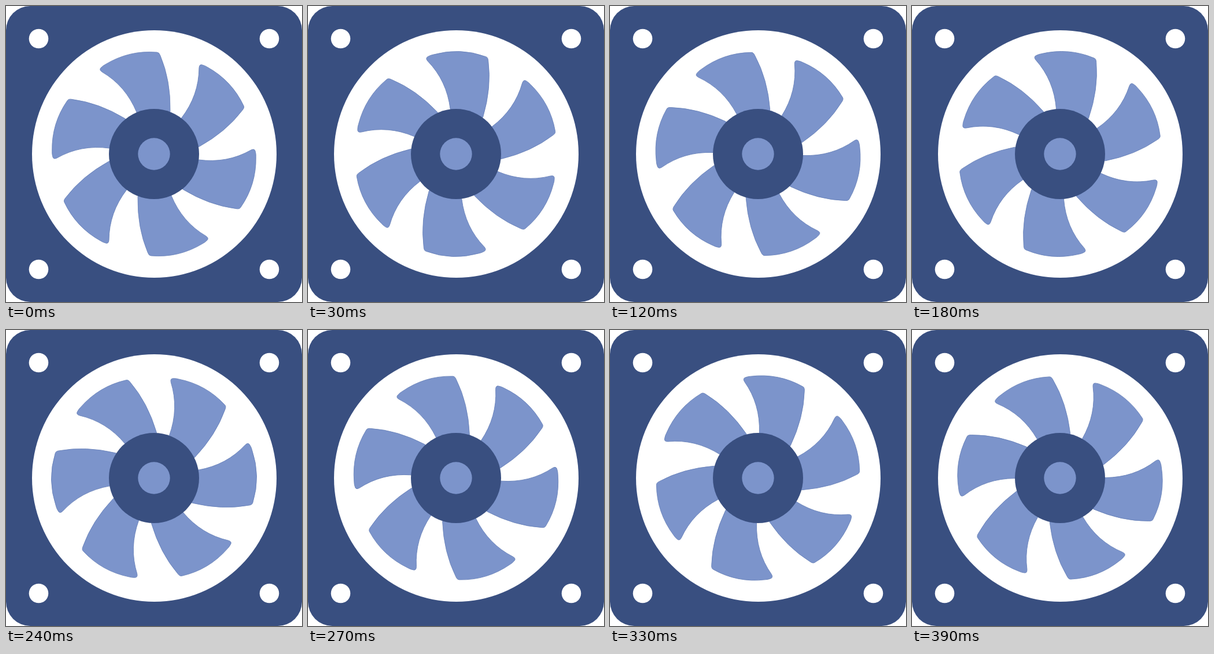
An HTML page with a canvas for the animation above (0.42 s loop, 512 by 512 pixels).

```html
<!DOCTYPE html>
<html lang="en">
<head>
<meta charset="utf-8">
<title>Fan</title>
<style>
html, body { margin: 0; width: 100%; height: 100%; overflow: hidden; background: #fff; }
canvas { display: block; width: 512px; height: 512px; }
</style>
</head>
<body>
<canvas id="stage" width="512" height="512"></canvas>
<script>
const ctx = document.getElementById('stage').getContext('2d');
const DARK = '#394f80', LIGHT = '#7c94cb', EDGE = '#6780b8', WHITE = '#fff';
const CENTER = 256, STEP = 30, STEPS = 14;

// [step, degrees]: the rotor speeds up and slows down over half a turn
const TURN = [[0, 0], [2, 30.8], [4, 54.5], [6, 77.9], [8, 102.4], [10, 130.5], [13, 172.2], [14, 180]];

const blade = new Path2D(`M226 184 Q207 138 166 114 Q160 110 165 106
  Q168 103 172 101 Q213.4 76 261 80 Q265 80 267 86 Q285 129 284 182 L256 256 Z`);

function disc(x, y, rx, color, ry = rx) {
  ctx.fillStyle = color;
  ctx.beginPath();
  ctx.ellipse(x, y, rx, ry, 0, 0, Math.PI * 2);
  ctx.fill();
}

function angleAt(step) {
  const i = TURN.findIndex(([s]) => s > step);
  const [s0, a0] = TURN[i - 1], [s1, a1] = TURN[i];
  return a0 + (a1 - a0) * (step - s0) / (s1 - s0);
}

function drawHousing() {
  ctx.fillStyle = WHITE;
  ctx.fillRect(0, 0, 512, 512);
  ctx.fillStyle = DARK;
  ctx.beginPath();
  ctx.roundRect(0, 0, 512, 512, 42);
  ctx.fill();
  disc(256.5, 256, 211.5, WHITE, 214);
  for (const x of [56.5, 455.5])
    for (const y of [56.5, 455.5]) disc(x, y, 16.8, WHITE);
}

function drawRotor(degrees) {
  ctx.fillStyle = LIGHT;
  ctx.strokeStyle = EDGE;
  ctx.lineWidth = 0.8;
  for (let i = 0; i < 6; i++) {
    ctx.save();
    ctx.translate(CENTER, CENTER);
    ctx.rotate((degrees + i * 60) * Math.PI / 180);
    ctx.translate(-CENTER, -CENTER);
    ctx.fill(blade);
    ctx.stroke(blade);
    ctx.restore();
  }
  disc(CENTER, CENTER, 78, DARK);
  disc(CENTER, CENTER, 27.7, LIGHT);
}

const start = performance.now();
function draw() {
  const time = Math.max(0, performance.now() - start);
  drawHousing();
  drawRotor(angleAt(Math.floor(time / STEP) % STEPS));
  requestAnimationFrame(draw);
}
draw();
</script>
</body>
</html>
```
